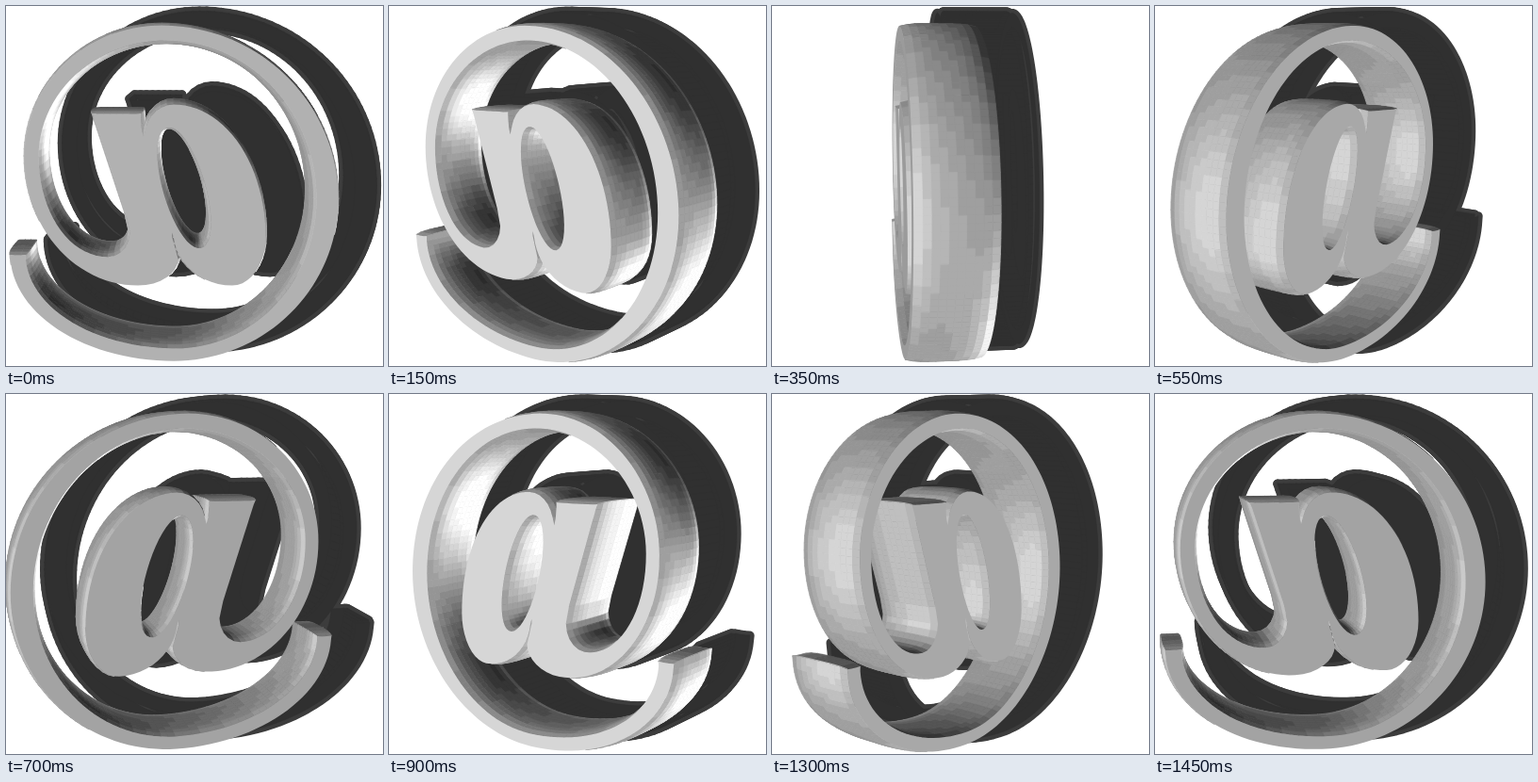
These frames come from a looping animation (400 by 382 pixels, 1.5 s). An HTML page with a canvas:

```html
<!DOCTYPE html>
<html lang="en">
<head>
<meta charset="utf-8">
<title>Spinning at sign</title>
<style>
html, body { margin: 0; width: 100%; height: 100%; overflow: hidden; background: #fff; }
canvas { display: block; }
</style>
</head>
<body>
<canvas id="stage" width="400" height="382"></canvas>
<script>
const ctx = document.getElementById('stage').getContext('2d');
const STEP = 50, STEPS = 30;
const CX = 175.5, CY = 199.5, FOCAL = 1000, DEPTH = 39, STRIPS = 10, BULGE = 1.4;
const SP = Math.sin(0.156), CP = Math.cos(0.156);

// Screen point on the near face at rest -> model point
function unproject([x, y]) {
  const sx = x - CX, sy = y - CY;
  const v = (sy * (FOCAL - DEPTH * CP) - FOCAL * DEPTH * SP) / (FOCAL * CP - sy * SP);
  return [sx * (FOCAL - DEPTH * CP + v * SP) / FOCAL, v];
}

// Quarter ellipses that leave their start vertically or horizontally, and lines
const curves = {
  vert: (a, b, t) => [b[0] + (a[0] - b[0]) * Math.cos(t), a[1] + (b[1] - a[1]) * Math.sin(t)],
  horiz: (a, b, t) => [a[0] + (b[0] - a[0]) * Math.sin(t), b[1] + (a[1] - b[1]) * Math.cos(t)],
  line: (a, b, t) => a.map((c, k) => c + (b[k] - c) * t * 2 / Math.PI)
};

function outline(start, ...segments) {
  const points = [];
  let from = start;
  for (const [kind, ...to] of segments) {
    const cuts = Math.ceil(Math.hypot(to[0] - from[0], to[1] - from[1]) / 7);
    for (let i = 0; i < cuts; i++) points.push(curves[kind](from, to, i / cuts * Math.PI / 2));
    from = to;
  }
  return points;
}

function ellipse(cx, cy, rx, ry, tilt, count) {
  return Array.from({ length: count }, (_, i) => {
    const t = i / count * 2 * Math.PI, x = rx * Math.cos(t), y = ry * Math.sin(t);
    return [cx + x * Math.cos(tilt) - y * Math.sin(tilt), cy + x * Math.sin(tilt) + y * Math.cos(tilt)];
  });
}

// The sign seen from behind: one spiral outline and the hole in the letter
const spiral = outline([3, 263],
  ['vert', 178, 378], ['horiz', 354, 205], ['vert', 165, 19], ['horiz', 18, 160],
  ['vert', 140, 298], ['horiz', 184, 268], ['line', 176, 239],
  ['vert', 240, 298], ['horiz', 277, 245], ['vert', 178, 103], ['horiz', 146, 137],
  ['line', 144, 113], ['line', 90, 113], ['line', 126, 222], ['line', 130, 240],
  ['vert', 108, 265], ['horiz', 36, 160], ['vert', 170, 38], ['horiz', 328, 205],
  ['vert', 180, 362], ['horiz', 22, 263], ['line', 3, 263]);
const hole = ellipse(189, 193, 21, 65, -0.28, 44);

const unit = v => {
  const len = Math.hypot(...v) || 1;
  return v.map(c => c / len);
};

// Each vertex carries the outward normals of its next edge and of its corner
const loops = [spiral, hole].map(points => {
  const loop = points.map(unproject);
  const next = i => loop[(i + 1) % loop.length];
  const normals = loop.map((p, i) => unit([p[1] - next(i)[1], next(i)[0] - p[0], 0]));
  return loop.map((p, i) => {
    const before = normals.at(i - 1);
    return { p, n: normals[i], corner: unit(normals[i].map((c, k) => c + before[k])) };
  });
});
const edges = loops.flatMap(loop => loop.map((a, i) => ({ a, b: loop[(i + 1) % loop.length] })));

// Light and dark areas of the studio: direction, spread, gain
const LAMPS = [
  { dir: [-0.5, 0.1, 0.86], spread: 0.15, gain: 0.26 },
  { dir: [0.75, 0.55, 0.35], spread: 0.12, gain: 0.5 },
  { dir: [1, 0.1, -0.05], spread: 0.05, gain: 0.42 },
  { dir: [0.71, -0.61, 0.35], spread: 0.18, gain: -0.4 },
  { dir: [0, -1, 0], spread: 0.15, gain: -0.2 }
];

function light(normal) {
  const n = unit(normal);
  return LAMPS.reduce((sum, { dir, spread, gain }) => {
    const dot = n[0] * dir[0] + n[1] * dir[1] + n[2] * dir[2];
    return sum + gain * Math.exp((dot - 1) / spread);
  }, 0.59);
}

function grey(e, levels) {
  const g = Math.round(Math.min(1, Math.round(e * levels) / levels) * 255);
  return `rgb(${g},${g},${g})`;
}

function trace(points) {
  points.forEach((p, i) => i ? ctx.lineTo(p[0], p[1]) : ctx.moveTo(p[0], p[1]));
  ctx.closePath();
}

function draw(step) {
  const yaw = step * 2 * Math.PI / STEPS, sin = Math.sin(yaw), cos = Math.cos(yaw);
  const turn = ([u, v, w]) => {
    const z = u * sin + w * cos;
    return [u * cos - w * sin, v * CP + z * SP, z * CP - v * SP];
  };
  // s runs through the thickness from -1 to 1; the rims are rounded in
  const at = ({ p, corner }, s) => {
    const out = BULGE * (1 - 2 * s ** 4);
    const [x, y, z] = turn([p[0] + corner[0] * out, p[1] + corner[1] * out, s * DEPTH]);
    const k = FOCAL / (FOCAL - z);
    return [CX + x * k, CY + y * k];
  };
  const side = turn([0, 0, 1])[2] * FOCAL > DEPTH ? 1 : -1;
  const front = turn([0, 0, side]);

  const facePath = s => {
    ctx.beginPath();
    loops.forEach(loop => trace(loop.map(v => at(v, s))));
  };

  ctx.clearRect(0, 0, 400, 382);
  ctx.lineJoin = ctx.lineCap = 'round';

  // Shadow: soft rim first, then the core
  ctx.save();
  ctx.translate(40.5, -14);
  for (const [color, width] of [['#3c3c3c', 9.5], ['#303030', 0.6]]) {
    ctx.fillStyle = ctx.strokeStyle = color;
    ctx.lineWidth = width;
    for (const { a, b } of edges) {
      ctx.beginPath();
      trace([at(a, 0.85), at(b, 0.85), at(b, -0.85), at(a, -0.85)]);
      ctx.fill();
      ctx.stroke();
    }
    for (const s of [-1, 1]) {
      facePath(s);
      ctx.fill();
      ctx.stroke();
    }
  }
  ctx.restore();

  // Walls, far to near
  const quads = [];
  for (const { a, b } of edges) {
    const normal = turn(a.n);
    const mid = turn([(a.p[0] + b.p[0]) / 2, (a.p[1] + b.p[1]) / 2, 0]);
    for (let i = 0; i < STRIPS; i++) {
      const s0 = 2 * i / STRIPS - 1, s1 = s0 + 2 / STRIPS, s = (s0 + s1) / 2;
      const slope = 8 * BULGE / DEPTH * s ** 3;
      const facing = normal.map((c, k) => c + front[k] * slope);
      const centre = mid.map((c, k) => c + front[k] * DEPTH * s);
      const seen = facing[2] * FOCAL - facing.reduce((sum, c, k) => sum + c * centre[k], 0);
      if (seen <= 0) continue;
      const shine = normal.map((c, k) => c + front[k] * (0.35 * s + 0.5 * s ** 5));
      quads.push({
        z: centre[2],
        tone: grey(light(shine), 24),
        pts: [at(a, side * s0), at(b, side * s0), at(b, side * s1), at(a, side * s1)]
      });
    }
  }
  quads.sort((p, q) => p.z - q.z);
  ctx.lineWidth = 0.8;
  for (const q of quads) {
    ctx.fillStyle = ctx.strokeStyle = q.tone;
    ctx.beginPath();
    trace(q.pts);
    ctx.fill();
    ctx.stroke();
  }

  facePath(side);
  ctx.fillStyle = grey(light(front), 255);
  ctx.fill();
}

let shown = -1;
const start = performance.now();
function tick() {
  const step = Math.floor((performance.now() - start) / STEP) % STEPS;
  if (step !== shown) draw(shown = step);
  requestAnimationFrame(tick);
}
tick();
</script>
</body>
</html>
```
